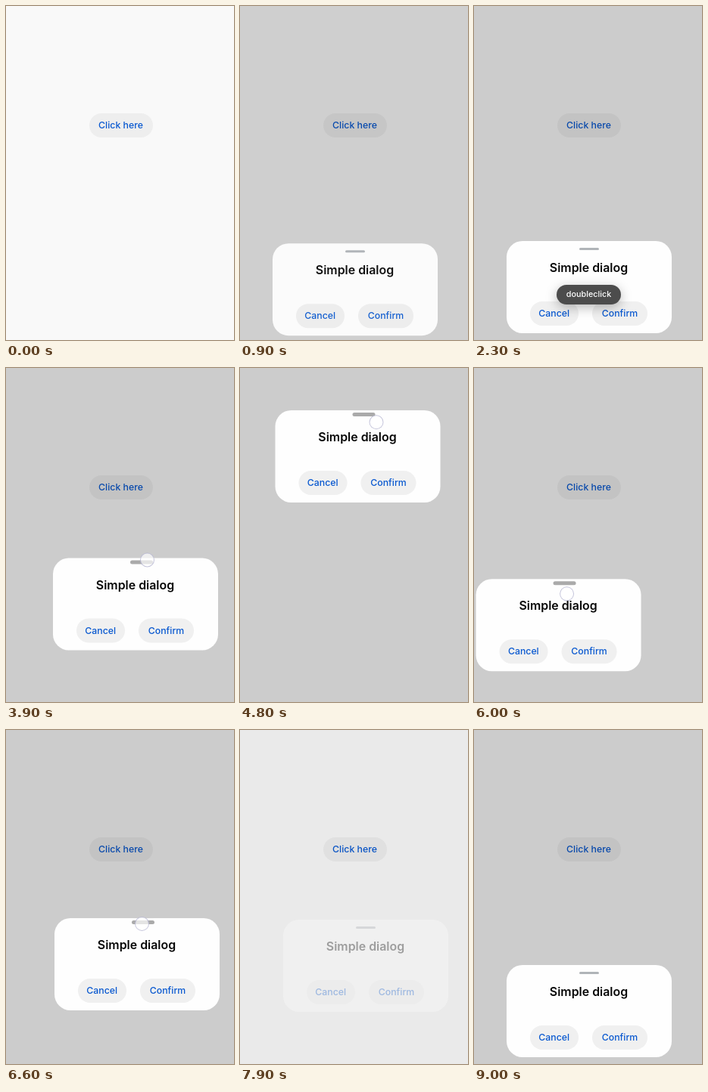
An HTML page that plays this animation: 301 px wide and 442 px high, repeating every 9.8 s.

```html
<!DOCTYPE html>
<html lang="en">
<head>
<meta charset="utf-8">
<title>Draggable dialog</title>
<style>
html, body { margin: 0; width: 100%; height: 100%; overflow: hidden; background: #f9f9f9; }
body { font: 500 12.3px Inter, "Noto Sans", sans-serif; }
#stage { position: relative; width: 301px; height: 442px; overflow: hidden; background: #f9f9f9; }
#stage div { position: absolute; box-sizing: border-box; white-space: nowrap; }
.btn { height: 32px; line-height: 32px; border-radius: 16px; text-align: center; background: #f0f0f0; color: #0a59d0; }
#open { left: 109.5px; top: 142px; width: 84px; background: #eee; }
#scrim { inset: 0; background: rgba(0, 0, 0, .182); }
#dialog { left: 0; top: 0; width: 218px; height: 122px; border-radius: 21px; background: #fefefe; }
#handle { border-radius: 3px; }
#title { left: 0; top: 24px; width: 217px; line-height: 23px; text-align: center; font-size: 15.9px; font-weight: 600; color: #060606; }
#cancel { left: 30.5px; top: 80px; width: 64.5px; }
#confirm { left: 113px; top: 80px; width: 73px; }
#toast { left: 109px; top: 369px; width: 85px; height: 26px; line-height: 26px; border-radius: 13px;
  text-align: center; font-size: 10.8px; color: #fff; background: #4c4c4c; box-shadow: 0 4px 15px rgba(0, 0, 0, .28); }
#touch { left: -9.5px; top: -9.5px; width: 19px; height: 19px; border-radius: 50%;
  background: rgba(255, 255, 255, .68); border: 1.5px solid rgba(150, 150, 190, .55); }
</style>
</head>
<body>
<div id="stage">
  <div id="open" class="btn">Click here</div>
  <div id="scrim"></div>
  <div id="dialog">
    <div id="handle"></div>
    <div id="title">Simple dialog</div>
    <div id="cancel" class="btn">Cancel</div>
    <div id="confirm" class="btn">Confirm</div>
  </div>
  <div id="toast">doubleclick</div>
  <div id="touch"></div>
</div>
<script>
const LOOP = 9800, STEP = 100, GRAB = 3500, DROP = 6800;
const [scrim, dialog, handle, toast, touch] =
  ["scrim", "dialog", "handle", "toast", "touch"].map(id => document.getElementById(id));

// Turning points of the drag: time, left, top
const path = [[GRAB, 43, 311], [3900, 62, 251.5], [4200, 88, 160], [4600, -20, 159], [4700, 75, 148],
  [4800, 46.5, 56], [5100, -15, 65], [5500, 108, 95], [6100, -8, 300], [6500, 81, 222],
  [6600, 64, 249], [DROP, 57, 251]];

const ramp = (t, from, to) => Math.min(1, Math.max(0, (t - from) / (to - from)));
const easeOut = u => 1 - (1 - u) ** 2;
const wave = (t, peak, period) => Math.cos((t - peak) / period * 2 * Math.PI);
const move = (node, x, y) => { node.style.transform = `translate(${x}px, ${y}px)`; };

// Smooth curve through the turning points
function along(t) {
  const last = path.length - 1;
  t = Math.min(DROP, Math.max(GRAB, t));
  const i = Math.min(last, path.findIndex(p => p[0] >= t) || 1) - 1;
  const a = path[i], b = path[i + 1], span = b[0] - a[0], u = (t - a[0]) / span;
  const slope = (k, c) => {
    if (k === 0 || k === last) return 0;
    const p = path[k - 1], n = path[k + 1];
    return (n[c] - p[c]) / (n[0] - p[0]) * span;
  };
  return [1, 2].map(c => {
    const d = b[c] - a[c], m = slope(i, c), n = slope(i + 1, c);
    return a[c] + u * (m + u * (3 * d - 2 * m - n + u * (m + n - 2 * d)));
  });
}

function draw(now) {
  const t = Math.floor(now % LOOP / STEP) * STEP;
  const reopened = t > 8200;
  const rise = easeOut(reopened ? ramp(t, 8400, 9000) : ramp(t, 600, 1000));
  const fade = reopened ? 0 : ramp(t, 7700, 8000);
  const [x, y] = along(reopened ? 0 : t);
  scrim.style.opacity = dialog.style.opacity = rise * (1 - fade);
  move(dialog, x, y + (1 - rise) * 50);
  toast.style.opacity = ramp(t, 1900, 2300) * (1 - ramp(t, 3100, 3300));

  const held = t > GRAB && t < DROP;
  const [w, h, cx, cy] = held ? [30, 4.5, 117, 5.5] : [26, 3, 108.5, 10];
  Object.assign(handle.style, {
    left: cx - w / 2 + "px", top: cy - h / 2 + "px",
    width: w + "px", height: h + "px", background: held ? "#aaa" : "#b0b4b8"
  });

  // The finger wanders a little around the handle
  touch.style.opacity = held ? 1 : 0;
  move(touch, x + 124 + 9 * wave(t, 4800, 3600), y + 13 + 11 * wave(t, 5500, 3200));
}

const start = performance.now();
function tick() {
  draw(performance.now() - start);
  requestAnimationFrame(tick);
}
tick();
</script>
</body>
</html>
```
